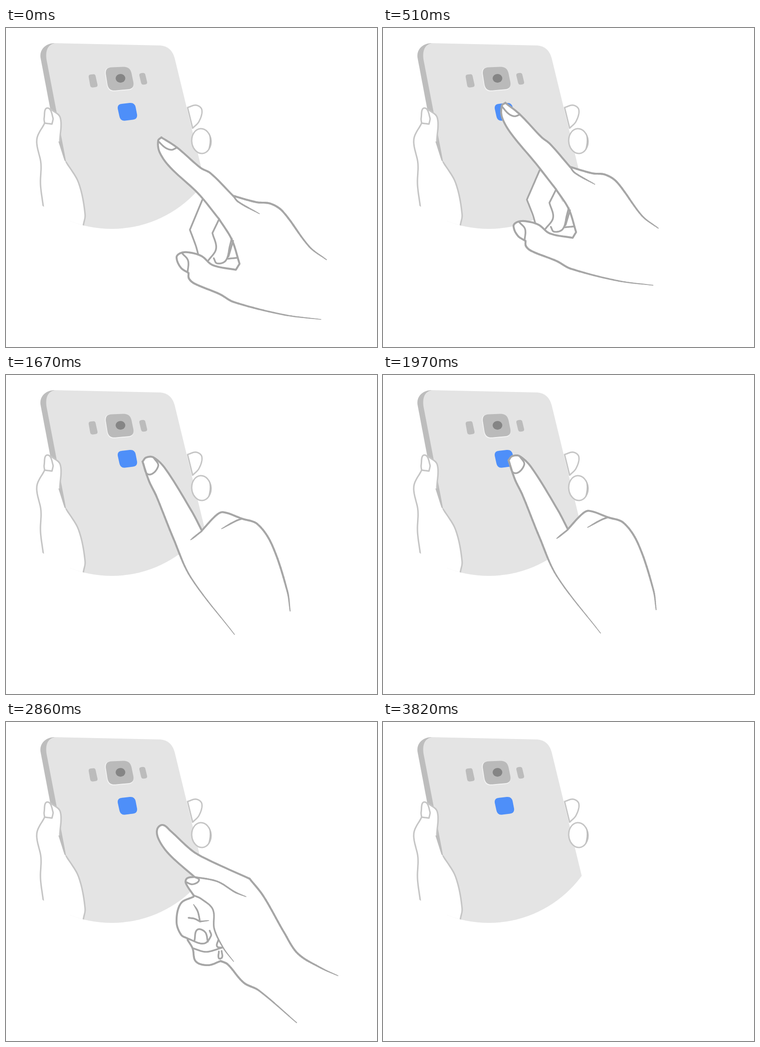
An HTML page for the animation above (3.99 s loop, 807 by 694 pixels).

```html
<!DOCTYPE html>
<html lang="en">
<head>
<meta charset="utf-8">
<title>Touch sensor</title>
<style>
html, body { margin: 0; width: 100%; height: 100%; overflow: hidden; background: #fff; }
svg { display: block; width: 807px; height: 694px; }
path { stroke-linecap: round; stroke-linejoin: round; }
</style>
</head>
<body>
<svg viewBox="0 0 807 694">
  <clipPath id="disc"><circle cx="230" cy="186" r="251"/></clipPath>
  <g id="phone" clip-path="url(#disc)"></g>
  <g id="press"></g>
  <g id="swipe"></g>
  <g id="tap"></g>
</svg>
<script>
const LOOP = 3990, STEP = 30;
const $ = id => document.getElementById(id);
const clamp = v => Math.max(0, Math.min(1, v));
const mix = (a, b, k) => a + (b - a) * k;
const parse = s => s.split(' ').map(p => p.split(',').map(Number));
const fix = p => p[0].toFixed(1) + ' ' + p[1].toFixed(1);
const gap = (a, b) => Math.hypot(b[0] - a[0], b[1] - a[1]);

// Smooth curve through key points; a doubled point makes a corner
function trace(pts) {
  const at = i => pts[Math.max(0, Math.min(pts.length - 1, i))];
  const out = [pts[0]];
  for (let i = 0; i < pts.length - 1; i++) {
    const [a, b, c, d] = [at(i - 1), at(i), at(i + 1), at(i + 2)];
    const len = gap(b, c) / 3;
    if (!len) continue;
    const pull = (p, q, axis) => (q[axis] - p[axis]) / (gap(p, q) || 1) * len;
    for (let n = 1; n <= 10; n++) {
      const t = n / 10, u = 1 - t;
      out.push([0, 1].map(x =>
        u * u * u * b[x] + 3 * u * u * t * (b[x] + pull(a, c, x)) +
        3 * u * t * t * (c[x] - pull(b, d, x)) + t * t * t * c[x]));
    }
  }
  return out;
}
const path = pts => 'M' + pts.map(fix).join('L');
const outline = s => path(trace(parse(s)));
const shape = (d, fill, stroke = 'none', w = 0) =>
  `<path d="${d}" fill="${fill}" stroke="${stroke}" stroke-width="${w}"/>`;

// A stroke that thins over its last third
function taper(pts, w, tip, color) {
  const n = pts.length - 1;
  return pts.slice(1).map((p, i) => {
    const k = Math.min(1, 3 * (n - i) / n);
    return shape(path([pts[i], p]), 'none', color, mix(tip, w, k).toFixed(2));
  }).join('');
}

// Polygon with rounded corners
function rounded(s, r) {
  const p = parse(s), n = p.length;
  const toward = (a, b) => [0, 1].map(x => mix(a[x], b[x], r / gap(a, b)));
  return 'M' + p.map((q, i) =>
    `${fix(toward(q, p[(i + n - 1) % n]))}Q${fix(q)} ${fix(toward(q, p[(i + 1) % n]))}`).join('L') + 'Z';
}

function drawPhone() {
  const grey = '#c5c5c5', dark = '#bdbdbd';
  const arm = '81,388 75,340 76,295 67,243 84,207';
  const nail = '84,207 83,196 90,174 102,195 100,209 100,209 84,207';
  const ball = '98,177 118,195 117,246';
  const palm = '131,292 158,337 172,405 168,430';
  const hand = [arm, '84,207 90,174 98,177', ball, palm].map(s => outline(s).slice(1)).join('L');
  $('phone').innerHTML =
    shape('M108 33H103C84 35 73 48 75 64L96 175L119 292L140 310L120 60Z', dark) +
    shape('M106 33L336 38Q360 40 367 66L436 350L420 440H140L131 292L88 68Q84 38 106 33Z', '#e4e4e4') +
    shape(rounded('213,86 269,85 280,134 222,139', 15), '#f4f4f4') +
    shape(rounded('215,86 270,84 280,132 223,137', 15), '#bababa') +
    '<ellipse cx="249" cy="109.5" rx="10.5" ry="9.5" fill="#858585"/>' +
    shape(rounded('179,102 194,100 200,128 184,130', 5), '#bcbcbc') +
    shape(rounded('289,99 302,97 308,122 295,124', 5), '#bcbcbc') +
    shape(rounded('241,166 280,162 287,198 249,203', 11), '#4e8ff9') +
    shape('M' + hand + 'L140 445L70 445Z', '#fff') +
    [arm, nail, ball, palm].map(s => shape(outline(s), 'none', grey, 3.2)).join('') +
    shape('M114 247H119L131 292L127 288Z', dark) +
    shape(outline('395,173 414,168 426,178 420,203 406,218') + 'Z', '#fff', grey, 3) +
    `<ellipse cx="425" cy="246" rx="21" ry="27" transform="rotate(-5 425 246)" fill="#fff" stroke="${grey}" stroke-width="3"/>` +
    shape('M441 229Q453 245 439 267Q446 246 441 229Z', dark);
}

// edge: outline from one wrist end round to the other; lines: inner details; creases: thinning lines
const press = {
  under: '427,374 400,439 400,439 418,492 440,507 500,526 508,513 463,415',
  edge: [
    '685,634 605,624 495,596 465,579 410,556 398,545 397,533',
    '397,533 380,521 371,499 379,490 396,488 425,496 450,516 500,526 500,526 508,513 508,513 491,460 463,415',
    '463,415 418,360 357,303 334,270 331,245 338,238',
    '338,238 372,260 423,304 445,316 494,365',
    '494,365 545,379 575,382 602,399 660,476 697,504'
  ],
  lines: [
    '427,374 400,439 400,439 413,474 418,492',
    '463,417 449,446 449,446 457,480 440,506',
    '452,501 459,512 478,506 487,474 491,458',
    '494,463 484,497',
    '482,502 503,500',
    '383,490 396,506 395,532',
    '331,246 346,260 360,265 372,260'
  ],
  creases: ['494,365 505,378 551,404']
};

const swipe = {
  edge: [
    '498,566 403,442 365,357 328,265 312,232 298,190',
    '298,190 306,181 322,181 348,206 405,298 427,340',
    '427,340 458,307 473,300 514,314',
    '514,314 548,326 580,372 613,472 619,515'
  ],
  lines: ['299,193 311,218 332,200 322,181'],
  creases: ['427,341 403,360', '514,314 499,320 470,336']
};

const tap = {
  edge: [
    '657,502 620,485 570,454 540,408 495,329 465,291',
    '465,291 375,250 340,230 293,187 276,174 264,183 267,205 290,238 345,287',
    '345,287 329,290 326,300 343,327',
    '343,330 315,345 306,385 316,413 330,421',
    '330,424 341,443 348,471 375,479 402,470',
    '402,470 417,477 452,517 485,534 567,604'
  ],
  lines: [
    '326,298 341,303 355,294 345,287',
    '330,421 365,432 381,415 378,404',
    '345,425 351,402 368,407 374,428',
    '341,442 370,450 405,441',
    '397,424 394,438 405,441',
    '398,449 398,464 405,462 404,448'
  ],
  creases: [
    '345,287 395,297 433,320 457,330',
    '343,327 360,335 385,358 388,400 408,442 430,471',
    '357,384 352,362 343,347',
    '332,376 345,378 357,384 357,384 376,382'
  ]
};

function drawHand(id, hand, warp = p => p) {
  const ink = '#a6a6a6', last = hand.edge.length - 1;
  const read = s => trace(parse(s).map(warp));
  const edges = hand.edge.map(read);
  const stroke = (pts, i) =>
    i === 0 ? taper([...pts].reverse(), 4.2, 1.6, ink) :
    i === last ? taper(pts, 4.2, 2, ink) : shape(path(pts), 'none', ink, 4.2);
  $(id).innerHTML =
    (hand.under ? shape(path(read(hand.under)) + 'Z', '#fff') : '') +
    shape(path(edges.flat()) + 'Z', '#fff') +
    edges.map(stroke).join('') +
    hand.lines.map(s => shape(path(read(s)), 'none', ink, 3.7)).join('') +
    hand.creases.map(s => taper(read(s), 3.4, 1.5, ink)).join('');
}

// The hand travels, its index finger turns, the wrist side shortens
const reach = k => ([x, y]) => {
  const turn = 0.1 * clamp((830 - x - y) / 100);
  return [
    x - k * (87 + turn * (y - 390) + 0.055 * Math.max(0, x - 490)),
    y - k * (63 - turn * (x - 460) + 0.045 * Math.max(0, y - 382))
  ];
};

const part = (t, from, to) => clamp(Math.floor((t - from) / STEP + 1e-6) * STEP / (to - from));
const fadeOut = (t, from, to) => 1 - Math.pow(part(t, from, to), 1.4);

function place(id, x, y, alpha) {
  const g = $(id);
  g.setAttribute('transform', `translate(${x.toFixed(2)} ${y.toFixed(2)})`);
  g.setAttribute('opacity', alpha.toFixed(3));
}

let lastReach = -1;
function render(t) {
  const k = part(t, 0, 510) - part(t, 780, 990);
  if (k !== lastReach) drawHand('press', press, reach(lastReach = k));
  place('press', 0, 0, fadeOut(t, 990, 1140));

  const inn = part(t, 1460, 1820), out = part(t, 1820, 2360);
  place('swipe', mix(55, -41, inn) + 58 * out, mix(20, -17, inn) + 45 * out,
    part(t, 1280, 1460) * fadeOut(t, 2360, 2540));

  const near = part(t, 2860, 3130) - part(t, 3300, 3510);
  place('tap', mix(65, -11, near), mix(50, -9, near),
    part(t, 2680, 2860) * fadeOut(t, 3610, 3820));
}

drawPhone();
drawHand('swipe', swipe);
drawHand('tap', tap);
render(0);
const start = performance.now();
(function tick() {
  render((performance.now() - start) % LOOP);
  requestAnimationFrame(tick);
})();
</script>
</body>
</html>
```
